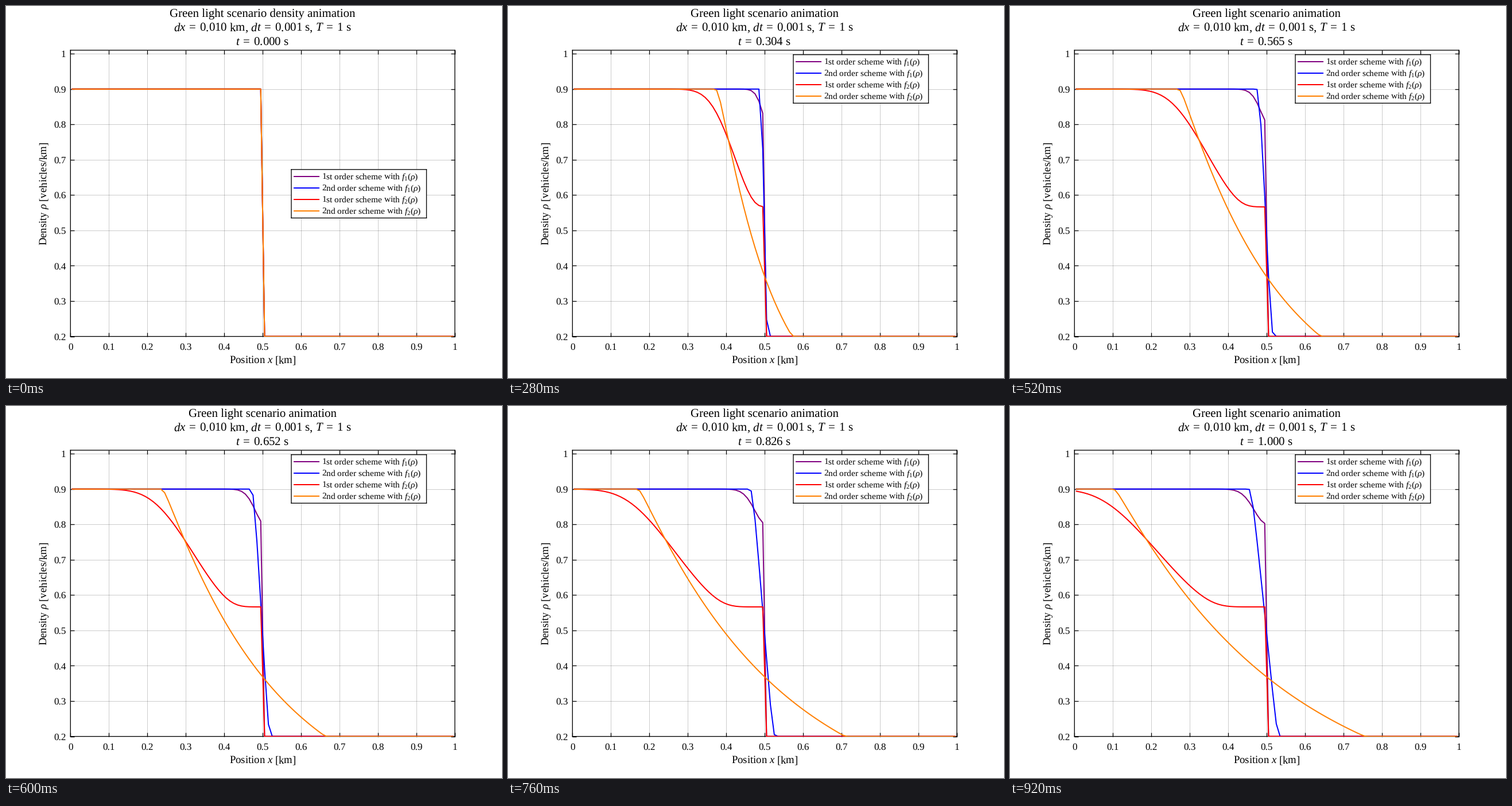
A matplotlib script that plays this animation: 864 px wide and 648 px high, repeating every 0.96 s.

```python
import matplotlib.pyplot as plt
import numpy as np
from matplotlib.animation import FuncAnimation

W, H = 864, 648
LEFT, RIGHT, TOP, BOTTOM = 112.3, 781.9, 77.0, 575.6
FRAMES, INTERVAL = 24, 40
DX, DT, STEPS = 0.01, 0.001, 1000

plt.rcParams.update({
    "font.family": "Liberation Serif",
    "mathtext.fontset": "custom",
    "mathtext.rm": "Liberation Serif",
    "mathtext.it": "Liberation Serif:italic",
    "text.hinting": "none",
})


# ---- traffic model -------------------------------------------------------

def f1(q):
    return 0.0573 * q * (1 - q)


def f2(q):
    return -q * np.log10(q)


def koren(ahead, behind):
    """Limited slope towards the face that lies on the 'ahead' side."""
    size = np.minimum(2 * np.minimum(abs(ahead), abs(behind)),
                      abs(ahead + 2 * behind) / 3)
    return np.where(ahead * behind > 0, np.sign(ahead) * size, 0)


def rate(q, f, order):
    padded = np.pad(q, 2, mode="edge")
    cells = padded[1:-1]
    ql, qr = cells[:-1], cells[1:]
    if order == 2:
        d = np.diff(padded)
        before, after = d[:-1], d[1:]
        ql = ql + koren(after, before)[:-1] / 2
        qr = qr - koren(before, after)[1:] / 2
    fl, fr = f(ql), f(qr)
    flux = np.where((fr - fl) * (qr - ql) >= 0, fl, fr)
    return -np.diff(flux) / DX


def solve(f, order):
    q = np.where(x < 0.5, 0.9, 0.2)
    states = [q]
    for _ in range(STEPS):
        k = rate(q, f, order)
        if order == 2:
            k = (k + rate(q + DT * k, f, order)) / 2
        q = q + DT * k
        states.append(q)
    return states


x = (np.arange(100) + 0.5) * DX
SERIES = [
    ("1st", 1, "#800080", solve(f1, 1)),
    ("2nd", 1, "#0000ff", solve(f1, 2)),
    ("1st", 2, "#ff0000", solve(f2, 1)),
    ("2nd", 2, "#ff8000", solve(f2, 2)),
]


# ---- stage ---------------------------------------------------------------

def pixel_rect(x0, y0, x1, y1):
    return [x0 / W, 1 - y1 / H, (x1 - x0) / W, (y1 - y0) / H]


def label(px, py, text, size, ha="center", **kw):
    return fig.text(px / W, 1 - py / H, text, fontsize=size, ha=ha,
                    va="baseline", color="black", **kw)


def style_box(axes):
    for spine in axes.spines.values():
        spine.set(linewidth=1.33, zorder=2.5, snap=False)


fig = plt.figure(figsize=(W / 72, H / 72), dpi=72, facecolor="white")
ax = fig.add_axes(pixel_rect(LEFT, TOP, RIGHT, BOTTOM))
ax.set(xlim=(0, 1), ylim=(0.2, 1.01),
       xticks=np.arange(11) / 10, yticks=np.arange(2, 11) / 10)
ax.set_axisbelow(True)
ax.grid(color="black", alpha=0.2, linewidth=1)
ax.tick_params(direction="in", length=6.7, width=1.3, top=True, right=True,
               labelbottom=False, labelleft=False)
style_box(ax)

for i in range(11):
    v = i / 10
    label(LEFT + v * (RIGHT - LEFT), 599, f"{v:g}", 17.1)
    if i >= 2:
        y = BOTTOM - (v - 0.2) / 0.81 * (BOTTOM - TOP)
        label(104.3, y + 5.8, f"{v:g}", 17.1, ha="right")

label(447, 622.5, r"Position $x$ [km]", 18.8)
label(71.5, 327, r"Density $\rho$ [vehicles/km]", 18.8,
      rotation=90, rotation_mode="anchor")

EQ = r"\hspace{0.26}=\hspace{0.26}"
title = label(447, 19, "", 20.9)
label(447, 43.3, f"$dx{EQ}0.010$ km, $dt{EQ}0.001$ s, $T{EQ}1$ s", 20.9)
clock = label(447, 68.3, "", 20.9)

curves = [ax.plot(x, states[0], color=color, linewidth=2, zorder=3)[0]
          for _, _, color, states in SERIES]

# Legend box in its own pixel-sized axes
LEG_W, LEG_H = 235.5, 84.5
legend = fig.add_axes([0, 0, 0.1, 0.1], zorder=5)
legend.set(xlim=(0, LEG_W), ylim=(LEG_H, 0), xticks=[], yticks=[])
style_box(legend)
for row, (rank, flux_no, color, _) in enumerate(SERIES):
    y = 12.3 + 20 * row
    legend.plot([4.5, 47.5], [y, y], color=color, linewidth=2)
    legend.text(53, y + 4.5, rf"{rank} order scheme with $f_{flux_no}(\rho)$",
                fontsize=15.4, va="baseline")


def update(i):
    step = round(i * STEPS / (FRAMES - 1))
    for curve, (_, _, _, states) in zip(curves, SERIES):
        curve.set_ydata(states[step])
    title.set_text("Green light scenario " + ("" if i else "density ") + "animation")
    clock.set_text(f"$t{EQ}{step * DT:.3f}$ s")
    y = 84.8 if i else 284.8
    legend.set_position(pixel_rect(497, y, 497 + LEG_W, y + LEG_H))
    return [*curves, title, clock]


anim = FuncAnimation(fig, update, frames=FRAMES, interval=INTERVAL,
                     repeat=True, repeat_delay=0, blit=False)
plt.show()
```
